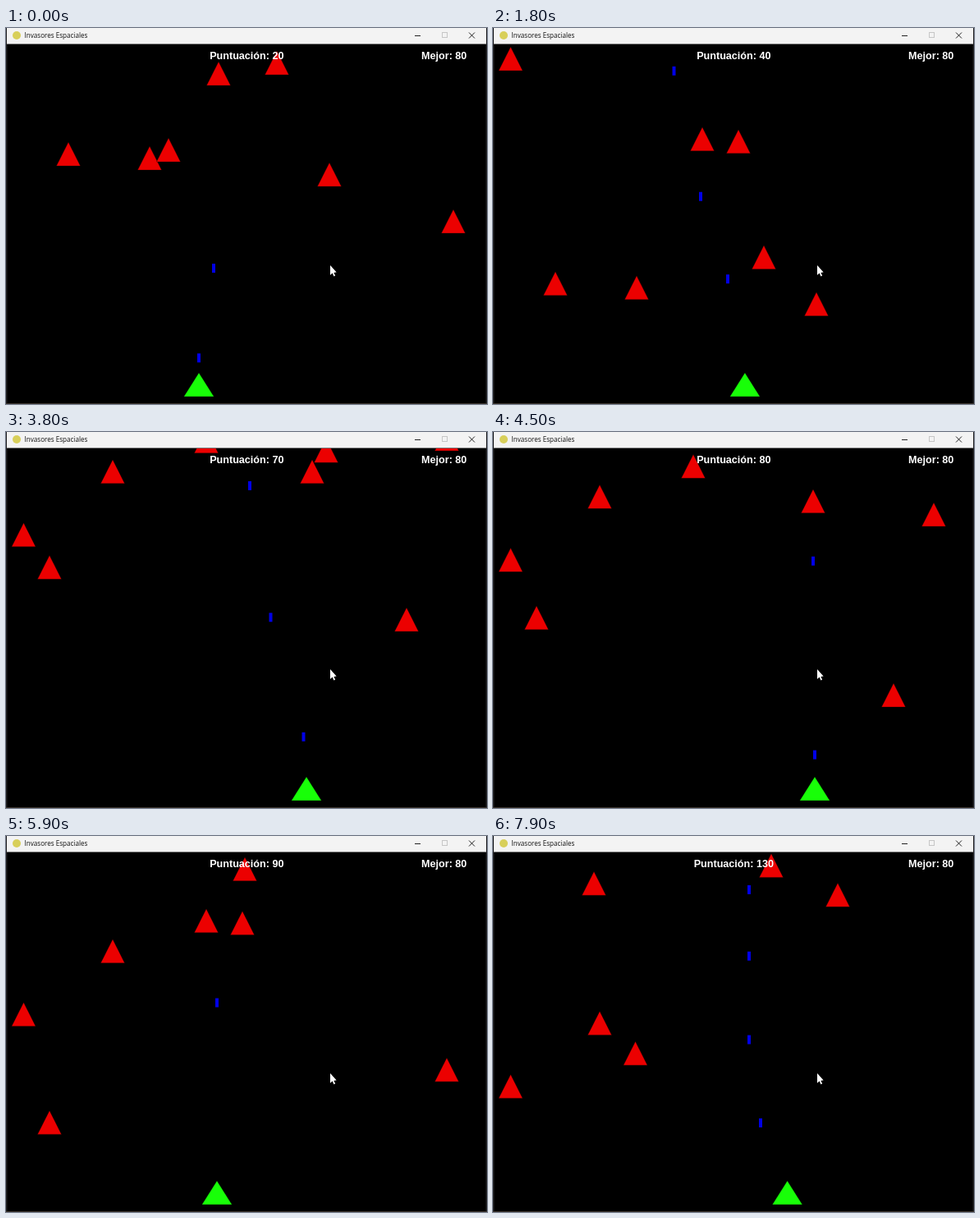
Write an HTML page with a canvas that moves like this. It is 586 px wide and 458 px high and loops after 8 s.

```html
<!DOCTYPE html>
<html lang="es">
<head>
<meta charset="utf-8">
<title>Invasores Espaciales</title>
<style>
html, body { margin: 0; width: 100%; height: 100%; overflow: hidden; background: #000; }
canvas { display: block; }
</style>
</head>
<body>
<canvas id="stage" width="586" height="458"></canvas>
<script>
const ctx = document.getElementById('stage').getContext('2d');
const LOOP = 8000, STEP = 100;        // ms; the game is shown at ten pictures a second
const TOP = 20, UNIT = 43.85, SHIP_SPEED = 218, SHOT_SPEED = 437; // px, px per second
const MUZZLE = 415, SHOT_H = 11, SIZE = 29, REACH = 16.4;

// Invaders fall at one, two or three units: [x, top at time zero]
const slow = [[21.5, -56], [130, -133], [244, -170], [373, -133], [291, -233], [339, -325]];
const medium = [[76, 139], [175, 144], [394, 164], [198, 134], [259, 41], [53, -183],
  [390, -325], [288, -426], [315, -600]];
const fast = [[545, 221], [330, 28], [255, -116], [299, -113], [488, -286], [537, -506],
  [173.5, -789], [123, -996], [420, -982]];
const invaders = [slow, medium, fast].flatMap((group, i) =>
  group.map(([x, top]) => ({ x, top, speed: (i + 1) * UNIT, end: Infinity })));

// The ship arrives at each place just in time to fire there: [time, x]
const shots = [
  [-0.28, 253], [-0.03, 235], [0.3, 212], [0.97, 220.5], [1.32, 253], [1.55, 286],
  [1.805, 308], [2, 326], [2.467, 348.5], [2.72, 340], [3, 297], [3.367, 322.5],
  [3.7, 362.5], [3.91, 390], [4.45, 392], [4.683, 392], [4.983, 352], [5.415, 257],
  [5.968, 257], [6.167, 257], [6.467, 282], [6.75, 282], [6.95, 308], [7.1, 312],
  [7.285, 312], [7.518, 312], [7.75, 326], [8.2, 424]
].map(([start, x]) => ({ start, x, end: Infinity }));

// Work out all hits in order of time; each one ends a shot and an invader
const hits = shots.flatMap(shot => invaders.map(foe => {
  const gap = MUZZLE - SHOT_H / 2 + SHOT_SPEED * shot.start - foe.top - SIZE;
  return { shot, foe, time: gap / (SHOT_SPEED + foe.speed) };
})).filter(({ shot, foe, time }) =>
  Math.abs(shot.x - foe.x) < REACH && time > shot.start && topAt(foe, time) + SIZE > TOP
).sort((a, b) => a.time - b.time).filter(({ shot, foe, time }) => {
  if (shot.end < time || foe.end < time) return false;
  shot.end = foe.end = time;
  return true;
});

function topAt(foe, t) {
  return foe.top + foe.speed * t;
}

function shipX(t) {
  const i = shots.findIndex(s => s.start > t);
  const next = shots[i], way = next.x - shots[i - 1].x;
  return next.x - Math.sign(way) * Math.min(Math.abs(way), SHIP_SPEED * (next.start - t));
}

function rect(x, y, w, h, color) {
  ctx.fillStyle = color;
  ctx.fillRect(x, y, w, h);
}

function trace(points) {
  ctx.beginPath();
  points.forEach(([x, y]) => ctx.lineTo(x, y));
}

function shape(color, ...points) {
  trace(points);
  ctx.fillStyle = color;
  ctx.fill();
}

function line(color, ...points) {
  trace(points);
  ctx.strokeStyle = color;
  ctx.stroke();
}

function triangle(x, top, half, color) {
  const corners = [[x, top], [x + half, top + SIZE], [x - half, top + SIZE], [x, top]];
  shape(color, ...corners);
  line('rgba(0, 0, 0, 0.3)', ...corners); // soft edge
}

function label(text, x, y, font, color, align) {
  ctx.font = font;
  ctx.fillStyle = color;
  ctx.textAlign = align;
  ctx.fillText(text, x, y);
}

function drawWindow() {
  rect(0, 0, 586, 458, '#1e1e20');
  rect(0, 457, 586, 1, '#3a332c');
  rect(1.5, 19, 583, 438, '#000');
  rect(1, 0, 584, 19.5, '#f3f3f3');
  ctx.fillStyle = '#d8cf5a';
  ctx.beginPath();
  ctx.arc(13, 9, 5, 0, 7);
  ctx.fill();
  label('Invasores Espaciales', 22.5, 12.2, '8.1px "Open Sans", "Noto Sans", sans-serif', '#111', 'left');
  line('#222', [498, 9.5], [505, 9.5]);
  ctx.strokeStyle = '#c6c6c6';
  ctx.strokeRect(531.5, 5.5, 6, 6);
  line('#222', [564, 5.5], [571, 12.5]);
  line('#222', [571, 5.5], [564, 12.5]);
}

function drawGame(t) {
  ctx.save();
  ctx.beginPath();
  ctx.rect(1, TOP, 584, 437);
  ctx.clip();
  for (const { x, start, end } of shots) {
    if (t < start || t >= end) continue;
    const y = MUZZLE - SHOT_SPEED * (t - start);
    rect(x - 2, y - SHOT_H / 2, 4, SHOT_H, '#0000e6');
  }
  triangle(shipX(t), 420, 18.3, '#18ff08');
  for (const foe of invaders) {
    if (t < foe.end) triangle(foe.x, topAt(foe, t), 14.6, '#ec0000');
  }
  const score = 20 + 10 * hits.filter(hit => hit.time <= t).length;
  const font = 'bold 12.6px "Liberation Sans", Arial, sans-serif';
  label('Puntuación: ' + score, 293.3, 38, font, '#fff', 'center');
  label('Mejor: 80', 533.7, 38, font, '#fff', 'center');
  shape('#fff', [395, 289], [395, 301], [397.6, 298.6], [399.4, 302.6],
    [401.2, 301.8], [399.4, 297.9], [402.6, 297.6]);
  ctx.restore();
}

function frame(now) {
  const t = Math.floor(now % LOOP / STEP) * STEP / 1000;
  drawWindow();
  drawGame(t);
  requestAnimationFrame(frame);
}
requestAnimationFrame(frame);
</script>
</body>
</html>
```
